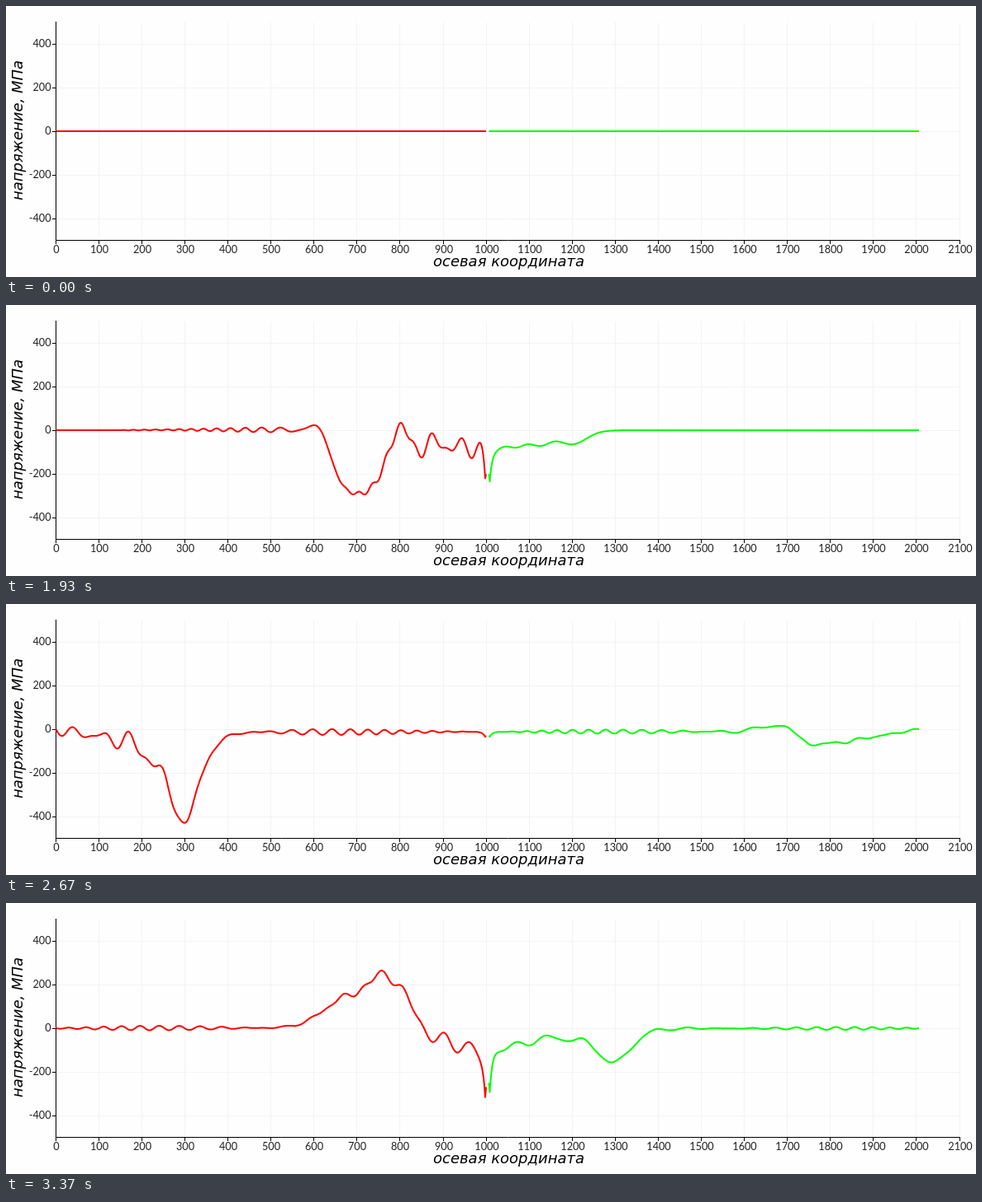
An HTML page with a canvas for the animation above (3400 ms loop, 1174x329 px).

```html
<!DOCTYPE html>
<html lang="ru">
<head>
<meta charset="utf-8">
<style>
html, body { margin: 0; width: 100%; height: 100%; overflow: hidden; background: #fefefe; }
canvas { display: block; }
</style>
</head>
<body>
<canvas id="stage" width="1174" height="329"></canvas>
<script>
const ctx = document.getElementById('stage').getContext('2d');
const LOOP = 3400, ZERO = 152;
const RED_X = 60.5, GREEN_X = 584.5, ROD = 520.5;

// Lengths and stresses in pixels (compression is positive), times in steps of 1/30 s.
const SPEED = 26.45, DISPERSION = 4.21;
const LOAD = 33.4, UNLOAD = 45.25, RELEASE = 46.3;
const STRESS = 79;

const clamp = (v, lo = 0, hi = 1) => Math.max(lo, Math.min(hi, v));
const smooth = (a, b, v) => { const u = clamp((v - a) / (b - a)); return u * u * (3 - 2 * u); };

// Dispersed step front: the Airy function (y'' = zy) integrated from +infinity down to z.
const Z_TOP = 6, Z_STEP = .01, Z_COUNT = 3400;
const airyStep = new Float32Array(Z_COUNT);
{
  let y = 9.95e-6, slope = 2.49 * y, sum = 0;
  for (let i = 0; i < Z_COUNT; i++) {
    airyStep[i] = sum;
    slope += (Z_TOP - i * Z_STEP) * y * Z_STEP;
    const next = y + slope * Z_STEP;
    sum += (y + next) / 2 * Z_STEP;
    y = next;
  }
}

function step(z) {
  if (z > Z_TOP) return 0;
  const ripple = smooth(-27, -20, z);
  if (!ripple) return 1;
  return 1 + (airyStep[Math.round((Z_TOP - z) / Z_STEP)] - 1) * ripple;
}

// Front launched at time start, seen at path length s.
function front(s, n, start) {
  const age = n - start;
  return age <= 0 ? 0 : step((s - SPEED * age) / (DISPERSION * Math.cbrt(age)));
}

// Front of a gradual change, spread over a launch interval.
const softFront = (s, n, start, ramp) =>
  [-.5, 0, .5].reduce((sum, k) => sum + front(s, n, start + k * ramp), 0) / 3;

const behind = (s, n) => SPEED * (n - LOAD) - s;

function incident(s, n) {
  const blow = 1 + .5 * Math.exp(LOAD - n);
  return STRESS * (blow * front(s, n, LOAD) - softFront(s, n, UNLOAD, .8));
}

// The contact passes on a part of the pulse that grows with time and ends late.
const transmitted = (s, n) => 11.5 * front(s, n, LOAD) + .085 * clamp(behind(s, n), 0, 343)
  - 37.5 * softFront(s, n, RELEASE, 1.6);

const reflected = (s, n) => transmitted(s, n) - incident(s, n);

// Second contact: each rod throws its own wave back and a new compression starts.
const secondPush = (s, n) => 17 * front(s + 40, n, LOAD) + .06 * clamp(behind(s + 40, n), 0, 200);

function red(x, n) {
  return incident(x, n) + reflected(2 * ROD - x, n) - reflected(2 * ROD + x, n)
    + secondPush(4 * ROD - x, n)
    + .2 * reflected(4 * ROD - x, n) + .8 * reflected(4 * ROD - x + 40, n);
}

function green(x, n) {
  return transmitted(ROD + x, n) - transmitted(3 * ROD - x, n)
    + transmitted(3 * ROD + x + 40, n) + secondPush(3 * ROD + x, n);
}

// Local stress peak beside the touching ends.
const peak = d => Math.min(.78 + .22 * d, 1) * Math.exp(-Math.max(0, d - 1) / 3.2);

function line(x1, y1, x2, y2, color) {
  ctx.strokeStyle = color;
  ctx.lineWidth = 1;
  ctx.beginPath();
  ctx.moveTo(x1, y1);
  ctx.lineTo(x2, y2);
  ctx.stroke();
}

function label(text, x, y, align) {
  ctx.textAlign = align;
  ctx.fillText(text, x, y);
}

function axes() {
  const columns = Array.from({ length: 22 }, (_, i) => Math.floor(60.35 + 52.08 * i) + .5);
  const rows = Array.from({ length: 5 }, (_, i) => 46.5 + 53 * i);
  columns.slice(1).forEach(x => line(x, 20, x, 284, '#f3f3f3'));
  rows.forEach(y => line(61, y, 1154, y, '#f3f3f3'));
  line(60.5, 19, 60.5, 285, '#000');
  line(60, 284.5, 1155, 284.5, '#000');
  ctx.fillStyle = '#222';
  ctx.font = '12.7px Lato, sans-serif';
  columns.forEach((x, i) => {
    line(x, 284, x, 289, '#000');
    label(String(i * 100), x + .5, 299.5, 'center');
  });
  rows.forEach((y, i) => {
    line(56, y, 60, y, '#000');
    label(String(400 - i * 200), 54.5, y + 3.8, 'right');
  });
  ctx.fillStyle = '#000';
  ctx.font = 'italic 18px "DejaVu Sans", sans-serif';
  label('осевая координата', 608.5, 316, 'center');
  ctx.save();
  ctx.translate(20, 151);
  ctx.rotate(-Math.PI / 2);
  label('напряжение, МПа', 0, 0, 'center');
  ctx.restore();
}

function plot(left, color, stress) {
  ctx.strokeStyle = color;
  ctx.lineWidth = 2;
  ctx.lineJoin = 'round';
  ctx.beginPath();
  for (let x = 0; x <= ROD; x += .5) ctx.lineTo(left + x, ZERO + stress(x));
  ctx.stroke();
}

function draw(n) {
  ctx.fillStyle = '#fefefe';
  ctx.fillRect(0, 0, 1174, 329);
  axes();
  const contact = 1.9 * Math.max(0, green(15, n));
  plot(RED_X, '#f00', x => red(x, n) + contact * peak(ROD - x));
  plot(GREEN_X, '#0f0', x => green(x, n) + contact * peak(x));
}

let shown = -1;
function tick() {
  const t = performance.now() % LOOP;
  const n = Math.floor(.3 * Math.floor(t / 10) + .15);
  if (n !== shown) draw(shown = n);
  requestAnimationFrame(tick);
}
tick();
</script>
</body>
</html>
```
